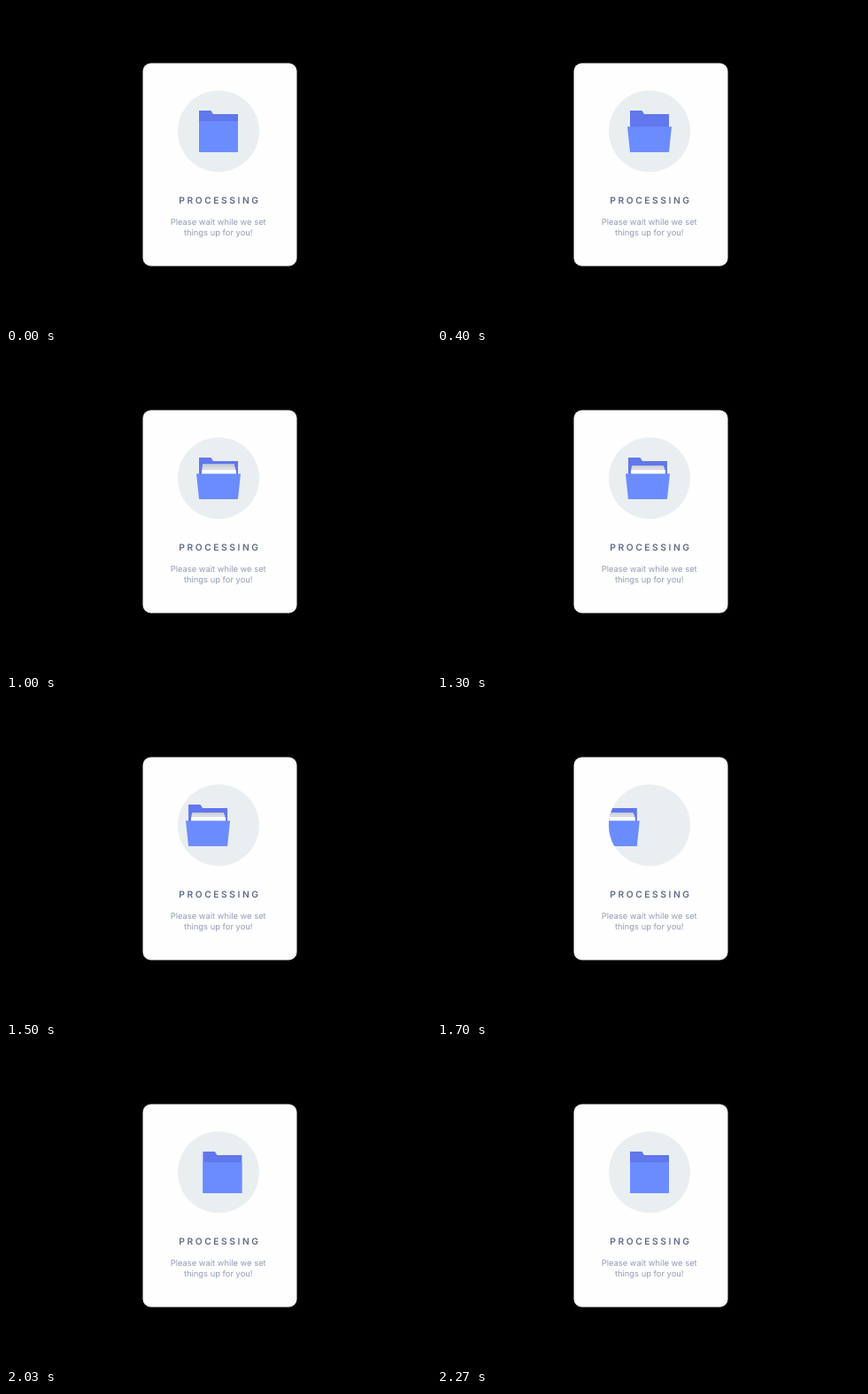
Recreate the animation shown at these times as an HTML page. Size 480 px wide and 360 px high, loop 2.31 s.

```html
<!DOCTYPE html>
<html lang="en">
<head>
<meta charset="utf-8">
<title>Processing</title>
<style>
  html, body { margin: 0; width: 100%; height: 100%; overflow: hidden; background: #000; }
  svg { display: block; width: 480px; height: 360px; }
  text { font-family: Inter, sans-serif; text-anchor: middle; text-rendering: geometricPrecision; }
  .title { font-size: 10.3px; font-weight: 600; letter-spacing: 2.55px; fill: #5f6b88; }
  .note { font-size: 9.4px; fill: #929bb4; }
</style>
</head>
<body>
<svg viewBox="0 0 480 360">
  <defs>
    <clipPath id="disc"><circle cx="240" cy="141.3" r="46"/></clipPath>
    <path id="back" d="M218 118H231.5L234 122H262V164.7H218Z" fill="#6177ec"/>
  </defs>
  <rect x="154.5" y="64.5" width="174" height="229" rx="9" fill="#fefefe"/>
  <circle cx="240" cy="141.3" r="46" fill="#e9eef1"/>
  <g clip-path="url(#disc)">
    <g id="full">
      <use href="#back"/>
      <path class="paper" d="M222 127H258V163H222Z" fill="#cbcfd7"/>
      <path class="paper" d="M221.5 129H259V163H221.5Z" fill="#d9dde3"/>
      <path class="paper" d="M221 132H260V163H221Z" fill="#fefefe"/>
      <path id="front" fill="#6b8cff"/>
    </g>
    <g id="fresh">
      <use href="#back"/>
      <path d="M218 130H262V164.7H218Z" fill="#6b8cff"/>
    </g>
  </g>
  <text class="title" x="241.4" y="222.6">PROCESSING</text>
  <text class="note" x="239.7" y="247.2">Please wait while we set</text>
  <text class="note" x="239.7" y="259.3">things up for you!</text>
</svg>
<script>
const LOOP = 2310;
const $ = id => document.getElementById(id);
const papers = document.querySelectorAll('.paper');
const progress = (t, start, length) => Math.min(1, Math.max(0, (t - start) / length));
const easeOut = u => 1 - (1 - u) ** 3;
const shift = (el, x, y) => el.setAttribute('transform', `translate(${x} ${y})`);

function draw(now) {
  const t = now % LOOP;

  // The front flap tilts open
  const open = easeOut(progress(t, 60, 340));
  const top = 130 + 6.2 * open, flare = 3 * open;
  $('front').setAttribute('d', `M${218 - flare} ${top}H${262 + flare}L262 164.7H218Z`);

  // Sheets drop in, the white one first
  papers.forEach((paper, i) => {
    const fall = easeOut(progress(t, 640 - 70 * i, 500));
    shift(paper, 0, -80 * (1 - fall));
  });

  // The filled folder leaves while an empty one arrives
  shift($('full'), -36 * Math.max(0, (t - 1053) / 647) ** 3, 0);
  shift($('fresh'), t < 1600 ? 120 : 26 * Math.max(0, (2230 - t) / 360) ** 3, 0);

  requestAnimationFrame(() => draw(performance.now()));
}
draw(performance.now());
</script>
</body>
</html>
```
